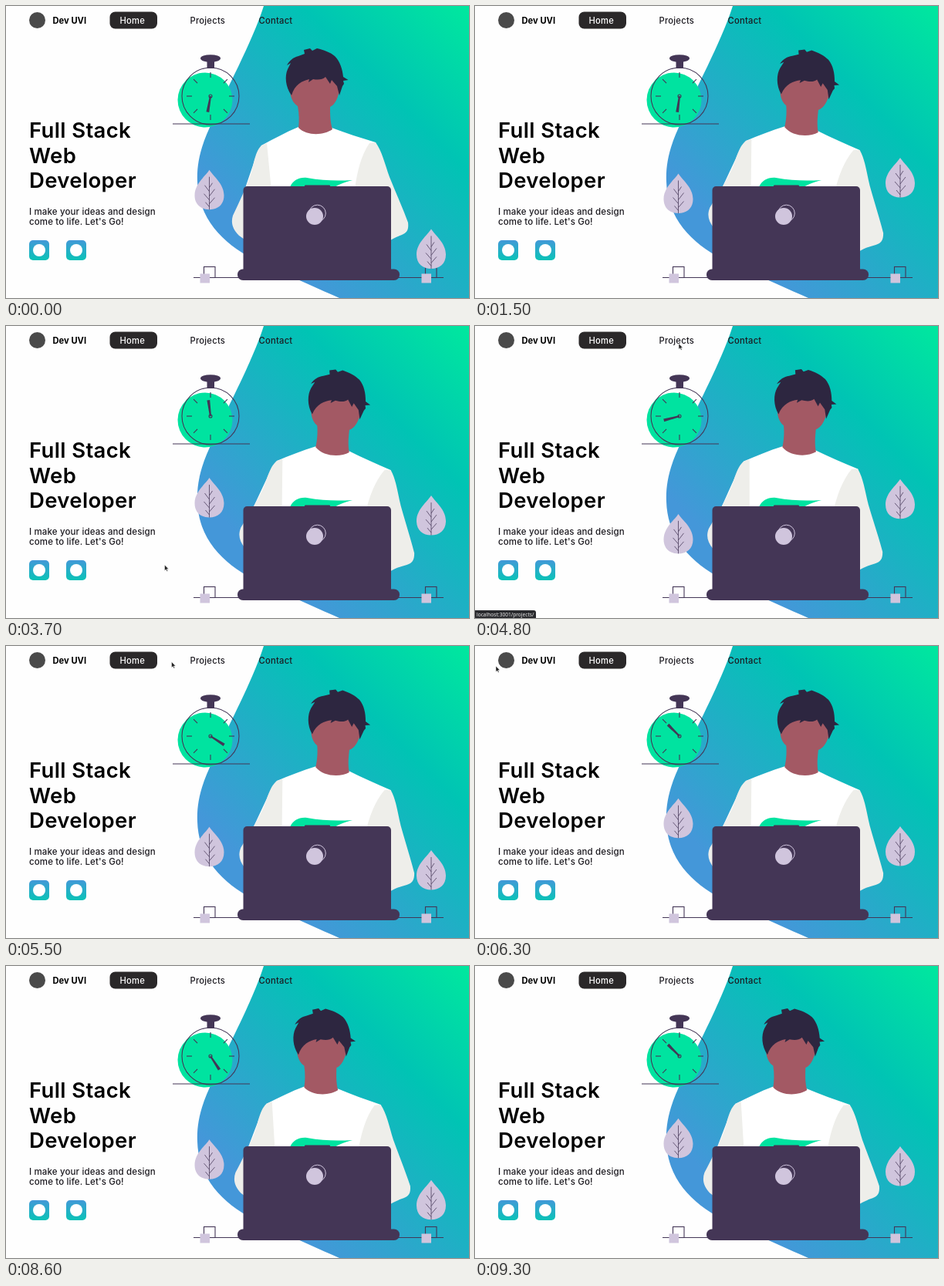
Recreate the animation shown at these times as an HTML page. Size 600 px wide and 379 px high, loop 9400 ms.

```html
<!DOCTYPE html>
<html lang="en">
<head>
<meta charset="utf-8">
<title>Portfolio</title>
<style>
html, body { margin: 0; width: 100%; height: 100%; overflow: hidden; background: #fefefe; }
svg { display: block; width: 600px; height: 379px; }
text { font-family: Inter, "Open Sans", sans-serif; fill: #1c1a20; }
.nav { font-size: 11.2px; font-weight: 500; letter-spacing: .25px; }
.head { font-size: 27.5px; font-weight: 600; letter-spacing: .35px; fill: #000; }
.copy { font-size: 11.5px; font-weight: 500; letter-spacing: .14px; }
.dark { fill: #443656; }
.line { fill: none; stroke: #443656; stroke-width: 1.1; }
.vein { fill: none; stroke: #443656; stroke-width: .75; }
.pale { fill: #d0c5dd; }
.sleeve { fill: #eeeeea; }
</style>
</head>
<body>
<svg viewBox="0 0 600 379">
  <defs>
    <linearGradient id="sea" gradientUnits="userSpaceOnUse" x1="300" y1="270" x2="585" y2="-15">
      <stop offset="0" stop-color="#4497d9"/>
      <stop offset=".62" stop-color="#00c4b4"/>
      <stop offset="1" stop-color="#00e89e"/>
    </linearGradient>
    <linearGradient id="tile" x1="0" y1="0" x2="0" y2="1">
      <stop offset="0" stop-color="#4299d8"/>
      <stop offset="1" stop-color="#0ac3b7"/>
    </linearGradient>
    <g id="leaf">
      <path class="pale" d="M0 0C5 8 19 18 19 33C19 45 11 51.500 0 51.500C-11 51.500-19 45-19 33C-19 18-5 8 0 0Z"/>
      <path class="vein" d="M0 9V51.500M0 23L4 17M0 28L-6 20M0 34L7 25M0 39L-7 31M0 44L7 36M0 48L-5 42"/>
    </g>
    <g id="pot">
      <rect class="line" x="256.500" y="338.500" width="14.500" height="14"/>
      <rect class="pale" x="251.500" y="347.500" width="12.500" height="12"/>
    </g>
  </defs>

  <rect width="600" height="379" fill="#fefefe"/>
  <path fill="url(#sea)" d="M334 0C318 50 284 110 269 147C252 181 247 205 248 228C250 290 300 322 350 342C380 356 405 367 432 379H600V0Z"/>

  <circle cx="40.500" cy="18.500" r="10.500" fill="#4a4a4a"/>
  <text class="nav" x="60.500" y="22.500" style="font-weight:700;letter-spacing:0;fill:#000">Dev UVI</text>
  <rect x="134.500" y="7.500" width="61.500" height="22" rx="7" fill="#2a2829"/>
  <text class="nav" x="147.500" y="22.500" style="fill:#fff">Home</text>
  <text class="nav" x="238.500" y="22.500">Projects</text>
  <text class="nav" x="327.500" y="22.500">Contact</text>

  <text class="head" x="30" y="171">Full Stack</text>
  <text class="head" x="30" y="203.500">Web</text>
  <text class="head" x="30" y="235.500">Developer</text>
  <text class="copy" x="30" y="270.500">I make your ideas and design</text>
  <text class="copy" x="30" y="284">come to life. Let's Go!</text>
  <g fill="url(#tile)">
    <rect x="30" y="304" width="26" height="26" rx="5"/>
    <rect x="78" y="304" width="26" height="26" rx="5"/>
  </g>
  <circle cx="43" cy="317" r="8" fill="#fff"/>
  <circle cx="91" cy="317" r="8" fill="#fff"/>

  <circle cx="258" cy="122" r="35.500" fill="#00e3a0"/>
  <g class="dark">
    <ellipse cx="265" cy="68" rx="13" ry="4.800"/>
    <rect x="260.500" y="69" width="9.500" height="12"/>
  </g>
  <circle class="line" cx="265" cy="117" r="37"/>
  <path class="line" d="M216 153H316"/>
  <g id="ticks"></g>
  <path id="hand" class="dark" d="M-1 0L-1.900-21H1.900L1 0Z"/>
  <circle class="line" cx="265" cy="117" r="2"/>

  <path class="line" d="M243 352.500H567"/>
  <use href="#pot"/>
  <use href="#pot" x="287"/>
  <use id="leafL" href="#leaf"/>
  <use id="leafR" href="#leaf"/>

  <g id="man">
    <path fill="#fff" d="M379 157C362 164 346 173 331 181L325 192L308 242L320 345H478L490 230L479 177C460 171 440 165 422 158Z"/>
    <path class="sleeve" d="M338 178L331 181C326 186 324 192 321 203C318 222 308 242 294 272C291 282 294 290 302 298L330 318L344 240Z"/>
    <path class="sleeve" d="M479 177C487 188 491 205 497 222C505 242 514 262 521 281C522 290 520 294 513 297C500 302 490 308 480 320L452 238C455 215 460 194 471 178Z"/>
    <path fill="#a35964" d="M369 96C366 112 369 124 378 130C380 140 380 150 379 158C390 169 412 168 423 160C420 150 420 140 420 131C429 127 433 112 433 96L400 84Z"/>
    <path fill="#2d2640" d="M370 116C362 105 361 91 365 82L369 74L364 77C368 70 372 67 379 65L387 62L386 57L394 55L397 58L403 55C412 57 420 60 426 65C433 72 436 82 437 92L443.500 96L437 97L438 101L436 104L432 116L429 104L422 96L420 101L414 92C410 96 404 96 398 95L392 99L393 95C384 97 374 102 370 116Z"/>
  </g>
  <path fill="#00e3a0" d="M368 235C372 226 380 222 390 223C412 227 430 227 449 226C436 229 430 233 424 236Z"/>

  <g class="dark">
    <rect x="387" y="232.500" width="33" height="5" rx="1"/>
    <rect x="307.500" y="234" width="191.500" height="114" rx="5"/>
    <rect x="300" y="341.500" width="210" height="14.500" rx="7"/>
  </g>
  <circle class="pale" cx="400" cy="273" r="11"/>
  <circle cx="403.500" cy="269" r="10.800" fill="none" stroke="#d0c5dd"/>

  <g id="status">
    <path fill="#292a2d" d="M0 369H76Q79 369 79 372V379H0Z"/>
    <text x="2" y="376.600" style="font-family:'Noto Sans',sans-serif;font-size:6.600px;fill:#e8e8e8">localhost:3001/projects/</text>
  </g>
  <path id="cursor" fill="#222" stroke="#fff" stroke-width=".5" d="M0 0V7.500L1.800 6L3 8.600L4.200 8L3 5.500H5.300Z"/>
</svg>
<script>
const LOOP = 9400, STEP = 100;
const CUT = 5500, SKIP = 220;   // the motion jumps ahead once per loop
const el = id => document.getElementById(id);
const hand = el('hand'), man = el('man'), cursor = el('cursor'), status = el('status');

let ticks = '';
for (let a = 0; a < 360; a += 45)
  ticks += `<path class="line" d="M0-24V-31" transform="translate(265 117) rotate(${a})"/>`;
el('ticks').innerHTML = ticks;

// CSS "ease": cubic-bezier(.25, .1, .25, 1)
function ease(p) {
  const curve = (s, a, b) => 3 * s * (1 - s) * (a * (1 - s) + b * s) + s ** 3;
  let lo = 0, hi = 1;
  for (let i = 0; i < 24; i++) {
    const mid = (lo + hi) / 2;
    if (curve(mid, .25, .25) < p) lo = mid; else hi = mid;
  }
  return curve(lo, .1, 1);
}

const bounce = x => 1 - Math.abs(x % 2 - 1);
const leafY = t => 289.5 - 92.5 * ease(bounce(t / 1500));

// Linear track through [time, ...values] keys
function track(keys, t) {
  let i = 0;
  while (i < keys.length - 2 && t >= keys[i + 1][0]) i++;
  const a = keys[i], b = keys[i + 1];
  const k = Math.min(1, Math.max(0, (t - a[0]) / (b[0] - a[0])));
  return a.slice(1).map((v, n) => v + (b[n + 1] - v) * k);
}

const SWAY = [[0, 0], [50, 2.06], [70, 2.06], [100, 6.2], [220, 6.2], [250, 5.4], [350, 0]];
const MOUSE = [[3600, 199, 350], [4000, 225, 190], [4500, 264, 23], [5300, 264, 22],
  [5700, 165, 19], [6200, 30, 21], [6300, 27, 26], [6700, 27, 26]];

function draw(time) {
  const t = Math.floor(time / STEP) * STEP;
  const late = t >= CUT;
  const s = late ? t + SKIP : t * .994;
  const beat = (late ? t + SKIP : t) % 350;
  hand.setAttribute('transform', `translate(265 117) rotate(${190 + s * .24})`);
  man.setAttribute('transform', `rotate(${track(SWAY, beat)[0]} 397 363)`);
  el('leafL').setAttribute('transform', `translate(263.500 ${leafY(s + 794)})`);
  el('leafR').setAttribute('transform', `translate(551 ${leafY(s)})`);
  const [x, y] = track(MOUSE, t);
  cursor.setAttribute('transform', `translate(${x} ${y})`);
  cursor.style.display = t >= 3600 && t < 6700 ? '' : 'none';
  status.style.display = t >= 4500 && t < 5500 ? '' : 'none';
}

const start = performance.now();
function tick() {
  draw((performance.now() - start) % LOOP);
  requestAnimationFrame(tick);
}
tick();
</script>
</body>
</html>
```
